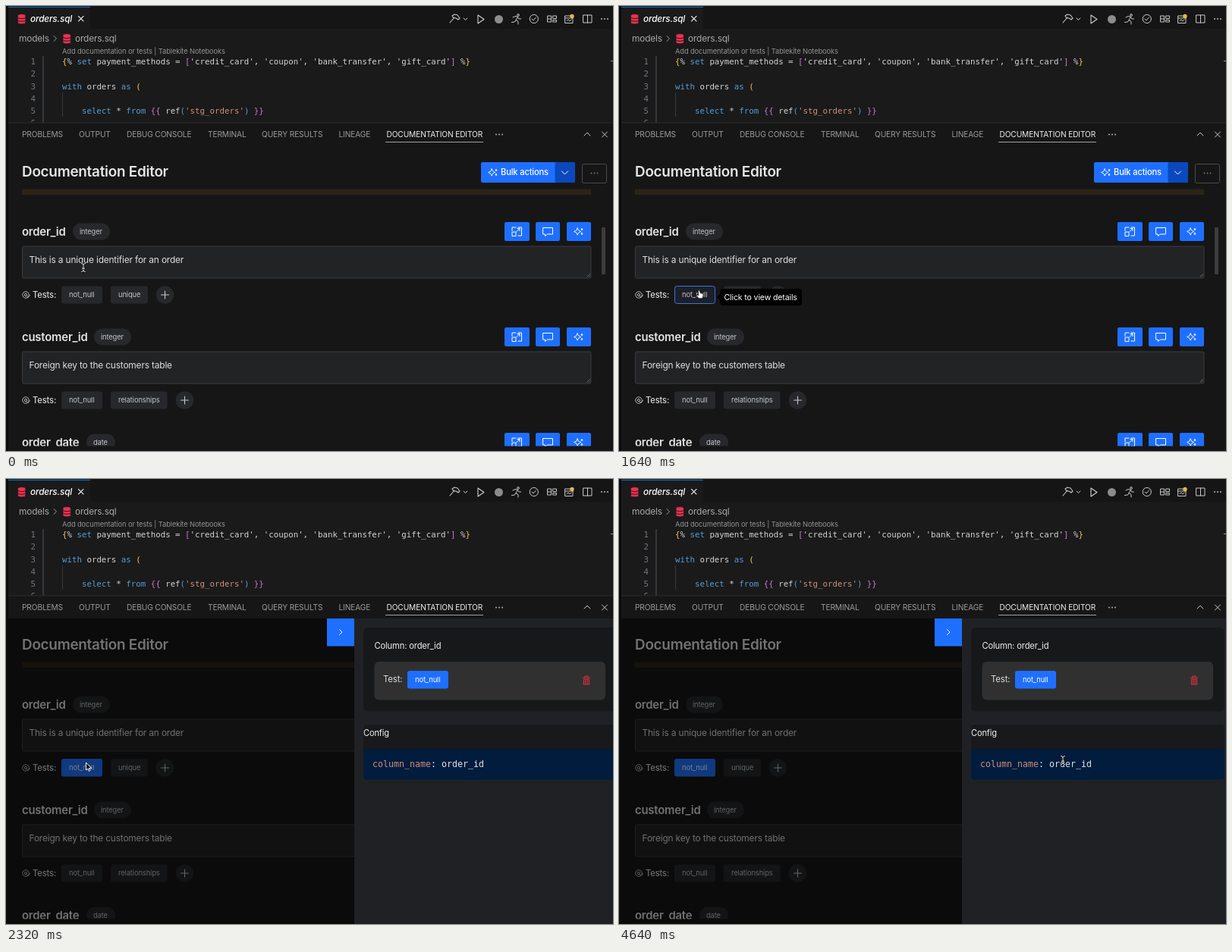
Animation of 800 by 587 pixels, one loop 4.68 s. Source, as an HTML page:

```html
<!DOCTYPE html>
<html lang="en">
<head>
<meta charset="utf-8">
<title>Documentation editor</title>
<style>
  html, body { margin: 0; width: 100%; height: 100%; overflow: hidden; background: #181818; }
  svg { display: block; width: 800px; height: 587px; }
  text { font-family: Inter, sans-serif; letter-spacing: -.014em; white-space: pre; }
  .mono { font-family: "DejaVu Sans Mono", monospace; letter-spacing: 0; }
</style>
</head>
<body>
<svg id="stage" viewBox="0 0 800 587"></svg>
<script>
const LOOP = 4680, BLUE = '#1f6fff', TAG = '#27282b', LIGHT = '#dcdcdc', GRAY = '#9b9b9b';

// Drawing helpers
const text = (x, y, size, str, fill = LIGHT, weight = 400, extra = '') =>
  `<text x="${x}" y="${y}" font-size="${size}" fill="${fill}" font-weight="${weight}" ${extra}>${str}</text>`;
const box = (x, y, w, h, fill, r = 0, extra = '') =>
  `<rect x="${x}" y="${y}" width="${w}" height="${h}" rx="${r}" fill="${fill}" ${extra}/>`;
const line = (d, color = '#c8c8c8', width = 1, fill = 'none') =>
  `<path d="${d}" stroke="${color}" stroke-width="${width}" fill="${fill}" stroke-linecap="round" stroke-linejoin="round"/>`;
const ring = (x, y, r, color = '#c8c8c8', fill = 'none') =>
  `<circle cx="${x}" cy="${y}" r="${r}" stroke="${color}" fill="${fill}"/>`;
const dots = (x, y, color) =>
  [-4, 0, 4].map(d => `<circle cx="${x + d}" cy="${y}" r=".9" fill="${color}"/>`).join('');
const star = (x, y, r) => {
  const k = r * .32;
  return line(`M${x} ${y - r}l${k} ${r - k}l${r - k} ${k}l${k - r} ${k}l${-k} ${r - k}l${-k} ${k - r}l${k - r} ${-k}l${r - k} ${-k}z`, '#fff', .9);
};
const sparkle = (x, y) => star(x - 1.8, y, 4.6) + star(x + 4, y - 2.8, 1.2) + star(x + 4, y + 3, 1.2);
const code = (x, y, size, parts) =>
  `<text class="mono" x="${x}" y="${y}" font-size="${size}">` +
  parts.map(([str, fill]) => `<tspan fill="${fill}">${str}</tspan>`).join('') + '</text>';
const database = (x, y) => [7.2, 3.6, 0].map(d =>
  `<path d="M${x} ${y + d}v2.2a5.2 2 0 0 0 10.4 0v-2.2a5.2 2 0 0 0-10.4 0z" fill="#e8324f" stroke="#191919" stroke-width=".9"/>`).join('');

function toolbar() {
  return line('M585 22l6-7M588 13l3-2 4 1 3 4-2 2-3-2-3 0z', '#c8c8c8', 1.1) + line('M603 16l2.5 2.5 2.5-2.5') +
    line('M622 12v11l8-5.500z', '#d0d0d0', 1.1) +
    `<circle cx="649.500" cy="17.500" r="5.500" fill="#8c8c8c"/>` +
    ring(675, 12, 1.4) + line('M668 15l3-1.500 3.500 1-2.500 4 3 2v3.500M672 18.500l-1.500 2.500-4 .5M674.500 14.500l1.500 2.500 2.500 0') +
    ring(695.8, 17, 5.6) + line('M693 17l2 2 3.500-4') +
    line('M714 13h4.500v8h-4.500zM714 17h4.500M721 13h4.500v3.500h-4.500zM721 18.500h4.500v2.500h-4.500z') +
    line('M737 13h10v9.500h-10zM737 16h10M739 19.500l2-1.500 2 2 2-2') + `<circle cx="746" cy="13.500" r="2.700" fill="#e6b84a"/>` +
    line('M761 12h11v10h-11zM766.500 12v10') + dots(789, 17, '#c8c8c8');
}

function editor() {
  const W = '#d4d4d4', B = '#569cd6', Y = '#f0c850', P = '#c678d0', S = '#ce9178';
  const lines = [
    [['{', Y], ['% ', W], ['set', B], [' payment_methods = ', W], ['[', P],
      ["'credit_card', 'coupon', 'bank_transfer', 'gift_card'", W], [']', P], [' %', W], ['}', Y]],
    [], [['with', B], [' orders ', W], ['as', B], [' ', W], ['(', Y]], [],
    [['    select', B], [' * ', W], ['from', B], [' ', W], ['{{', P], [' ref', W], ['(', B],
      ["'stg_orders'", S], [')', B], [' ', W], ['}}', P]], []
  ];
  return box(0, 0, 800, 154, '#1a1a1a') + box(111, 0, 689, 30, '#151515') +
    box(3, 1, 108, 1, '#0f6cbd') +
    database(15.5, 12.5) + text(32, 21, 11.8, 'orders.sql', '#fff', 500, 'font-style="italic"') +
    line('M95.500 13.500l6.500 6.500M102 13.500l-6.500 6.500', '#ddd', 1.1) + toolbar() +
    text(17, 47, 11.9, 'models', '#a8a8a8') + line('M63 39.500l3.500 3.500-3.500 3.500', GRAY) +
    database(75, 38.5) + text(91, 47, 11.9, 'orders.sql', '#a8a8a8') +
    text(74, 62.5, 9.35, 'Add documentation or tests | Tablekite Notebooks', '#929292') +
    box(48, 66, 2, 88, '#34373b') + box(74, 114, 1, 32, '#3a3a3a') + box(797, 72, 3, 1, '#999') +
    `<g clip-path="url(#editorClip)">` + lines.map((parts, i) => {
      const y = 77.3 + i * 16.1;
      return code(32.5, y, 10.77, [[i + 1, '#6e7681']]) + code(74, y, 10.77, parts);
    }).join('') + '</g>';
}

function panelTabs() {
  const tabs = [[21, 'PROBLEMS'], [96, 'OUTPUT'], [159, 'DEBUG CONSOLE'], [266, 'TERMINAL'],
    [337, 'QUERY RESULTS'], [438.5, 'LINEAGE'], [501.5, 'DOCUMENTATION EDITOR']];
  return box(0, 154, 800, 433, '#161617') + box(3, 153.5, 797, 1, '#2d2d2d') +
    tabs.map(([x, name], i) => text(x, 173, 10.2, name, i == 6 ? '#eee' : GRAY)).join('') +
    box(500, 179, 129, 1, '#a0a0a0') + dots(650, 169.5, '#c0c0c0') +
    line('M762 171l4-4 4 4') + line('M785.500 166l7 7M792.500 166l-7 7');
}

const tag = (x, y, w, label) =>
  box(x, y - 11.5, w, 23, TAG, 3) + text(x + 10, y + 3.4, 9.4, label, '#c4c4c4');

function column(y, name, type, pillX, pillW, note, tests, plusX) {
  const button = (x, w = 33) => box(x, y - 12.5, w, 25, BLUE, 2);
  let out = text(21, y + 5.3, 14.9, name, '#e4e4e4', 600) +
    box(pillX, y - 11, pillW, 22, TAG, 11) + text(pillX + 9, y + 3, 9.3, type, '#c4c4c4') +
    button(657) + button(698, 32) + button(739, 32) +
    line(`M672 ${y - 5.5}h-5v4.500M667 ${y + 1}v5h5v-5zM675 ${y - 5.5}h4.500v11h-4.500M673 ${y}l4-4M674 ${y - 4}h3v3`, '#fff') +
    line(`M708 ${y - 5}h12.500v8.500h-7l-3 2.500v-2.500h-2.500z`, '#fff') + sparkle(755, y);
  if (!note) return out;
  const t = y + 83;
  out += box(21.5, y + 19.5, 749.5, 42, '#222325', 2, 'stroke="#3b3c3e"') +
    line(`M766 ${y + 59.5}l3.500-3.500M768.500 ${y + 59.5}l1-1`, '#888', .7) +
    text(30.5, y + 41.5, 11.9, note, '#dedede') +
    ring(26, t + .5, 4.2, '#b8b8b8') + ring(26, t + .5, 1.6, '#b8b8b8') + line(`M27 ${t + 2}l2 2 2.500-3`, '#b8b8b8') +
    text(35, t + 4, 11.2, 'Tests:', '#d8d8d8', 500) +
    tests.map(([x, w, label]) => tag(x, t + .5, w, label)).join('') +
    `<circle cx="${plusX}" cy="${t + .5}" r="11.800" fill="${TAG}"/>` +
    line(`M${plusX - 5} ${t + .5}h10M${plusX} ${t - 4.5}v10`, '#c8c8c8', 1.1);
  return out;
}

function documentation() {
  return text(21, 225.3, 18.9, 'Documentation Editor', '#e6e6e6', 600) +
    box(21, 241.5, 750, 7.5, '#2c2418', 1) +
    box(626, 206, 124, 27, BLUE, 2) + box(723.5, 206, 26.5, 27, '#0a48bd', 2) +
    sparkle(642, 219.5) + text(652, 223.4, 11.15, 'Bulk actions', '#fff', 500) + line('M732.500 218l4 4 4-4', '#fff') +
    box(759.5, 208.5, 32, 25, 'none', 2, 'stroke="#4a4a4a"') + dots(775.5, 220.5, '#777') +
    box(785, 292, 5, 62, '#3c3c3e', 1) +
    `<g clip-path="url(#listClip)">` +
    column(297.5, 'order_id', 'integer', 88, 49, 'This is a unique identifier for an order',
      [[73, 54, 'not_null'], [138, 49, 'unique']], 209.5) +
    column(436.5, 'customer_id', 'integer', 116, 49, 'Foreign key to the customers table',
      [[73, 54, 'not_null'], [138, 74.5, 'relationships']], 235.5) +
    column(575.5, 'order_date', 'date', 106, 38) + '</g>' +
    `<g id="hover">${box(73.5, 369.5, 53, 23, '#1c2028', 3, 'stroke="#3d73d6"')}${text(83, 384.4, 9.4, 'not_null', '#c4c4c4')}</g>` +
    `<g id="pressed">${box(73, 369, 54, 23.5, '#2173ff', 3)}${text(83, 384.4, 9.4, 'not_null', '#fff')}</g>` +
    `<g id="tip">${box(133, 373, 108, 22, '#000', 4)}<path d="M133 380l-4 4 4 4z"/>${text(138.5, 387.8, 10.6, 'Click to view details', '#fff')}</g>`;
}

// Laid out from the drawer's own left edge
function drawer() {
  return box(0, 184, 348, 403, '#202124') +
    box(-36, 184, 36, 36.5, BLUE) + line('M-19.500 198.500l3.500 3.500-3.500 3.500', '#fff') +
    box(12, 196, 334, 110.5, '#17181a', 6) + text(26.5, 224.3, 11.2, 'Column: order_id', '#f0f0f0') +
    box(26.5, 241, 304.5, 50.5, '#303031', 6) + text(38, 268, 11.4, 'Test:', '#ddd') +
    box(70, 253, 54, 23.5, BLUE, 3) + text(80, 267.6, 9.4, 'not_null', '#fff') +
    line('M301 262h10M304 262v-2h4v2M302.500 264h7v7h-7zM304.800 264v7M307.200 264v7', '#d0303f', 1.2) +
    box(12, 324, 334, 40, '#18191b', 5) + text(12, 338.6, 11.1, 'Config', '#f0f0f0') +
    box(12, 356, 334, 40.5, '#011c3c', 4) +
    code(24, 379.5, 11.63, [['column_name', '#d08c80'], [': order_id', '#dde4ec']]);
}

const beam = 'M-2.500-5.500q2 0 2.500 1.500q.5-1.500 2.500-1.500M0-4v8M-2.500 5.500q2 0 2.500-1.500q.5 1.500 2.500 1.500M-1.500 1h3';
const cursors = {
  beam: line(beam, '#000', 2.2) + line(beam, '#eee'),
  hand: line('M-1.500-5q1.500-.8 2 1l.5 2.500 3 .8q1.500.5 1 2.500l-1 4h-5l-3-4q-.5-1.500 1-1l1.500 1z', '#111', .8, '#fff'),
  arrow: line('M-1.500-5.500v9.500l2.200-2 1.500 3.300 1.600-.7-1.500-3.200h3z', '#fff', 1, '#000')
};

const stage = document.getElementById('stage');
stage.innerHTML =
  `<clipPath id="editorClip">${box(0, 0, 800, 153, '#000')}</clipPath>
   <clipPath id="listClip">${box(0, 184, 800, 396.5, '#000')}</clipPath>` +
  editor() + panelTabs() + documentation() + box(0, 0, 3, 587, '#0c0c0d') +
  `<rect id="mask" x="3" y="184" width="797" height="403"/><g id="drawer">${drawer()}</g><g id="cursor">` +
  Object.entries(cursors).map(([name, shape]) => `<g id="${name}">${shape}</g>`).join('') + '</g>';
const part = id => document.getElementById(id);

// Motion
const ramp = (t, from, to) => Math.min(1, Math.max(0, (t - from) / (to - from)));
const smooth = p => p * p * (3 - 2 * p);
const bezier = (s, a, b) => 3 * (1 - s) ** 2 * s * a + 3 * (1 - s) * s * s * b + s ** 3;
function easeInOutCirc(p) {
  let lo = 0, hi = 1;
  for (let i = 0; i < 20; i++) {
    const mid = (lo + hi) / 2;
    if (bezier(mid, .78, .15) < p) lo = mid; else hi = mid;
  }
  return bezier(lo, .14, .86);
}
const show = (id, on) => part(id).setAttribute('opacity', +on);

function draw(t) {
  const toTag = smooth(ramp(t, 480, 960)), toConfig = smooth(ramp(t, 2600, 3320));
  const x = 102 + 4 * toTag + ramp(t, 1960, 2120) + 482 * toConfig - 4 * smooth(ramp(t, 3700, 4300));
  const y = 345 + 35 * toTag - 9 * toConfig;
  const pressed = t >= 1880, overTag = y > 369 && !pressed;
  part('cursor').setAttribute('transform', `translate(${x} ${y})`);
  const kind = overTag ? 'hand' : y < 359 || x > 464 ? 'beam' : 'arrow';
  for (const name in cursors) show(name, name == kind);
  show('hover', overTag);
  show('pressed', pressed);
  show('tip', pressed ? 0 : ramp(t, 940, 1090));
  show('mask', .5 * smooth(ramp(t, 1890, 2110)));
  show('drawer', t > 2050);
  const left = Math.floor(800 - 348 * easeInOutCirc(ramp(t, 2050, 2350)));
  part('drawer').setAttribute('transform', `translate(${left} 0)`);
}

function tick() {
  draw(Math.floor(performance.now() % LOOP / 40) * 40);
  requestAnimationFrame(tick);
}
tick();
</script>
</body>
</html>
```
